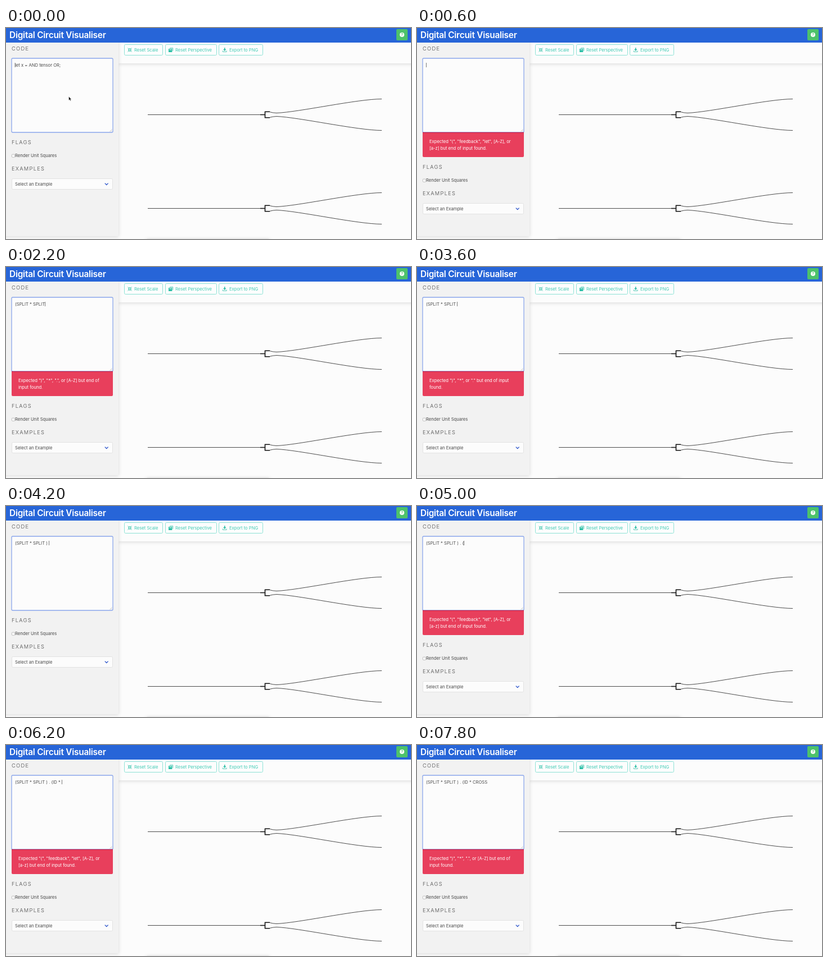
Animation of 720x376 px, one loop 8 s. Source, as an HTML page:

```html
<!DOCTYPE html>
<html lang="en">
<head>
<meta charset="utf-8">
<title>Digital Circuit Visualiser</title>
<style>
  html, body { margin: 0; width: 100%; height: 100%; overflow: hidden; background: #fcfcfc; }
  svg { display: block; width: 720px; height: 376px; }
  text { font: 400 7.65px Inter, Roboto, sans-serif; font-feature-settings: "calt" 0; fill: #4a4a4a; white-space: pre; }
  .title { font-size: 15.4px; font-weight: 600; letter-spacing: -.23px; fill: #fff; }
  .heading { font-size: 9.3px; font-weight: 300; letter-spacing: 1.3px; }
  .panel { filter: drop-shadow(0 1px 3px rgba(10, 10, 10, .15)); }
  .button rect { fill: #fdfdfd; stroke: #8ce2d5; }
  .button text { fill: #3fcbb4; }
  .icon { fill: none; stroke: #2bbfa6; stroke-width: .8; }
  .solid { fill: #2bbfa6; }
  .error text { fill: #fff; }
  .wire { fill: none; stroke: #111; stroke-width: .75; }
  .thick { stroke-width: 1.6; }
</style>
</head>
<body>
<svg viewBox="0 0 720 376">
  <defs>
    <g id="gate" class="wire">
      <path d="M252 154.5H453"/>
      <path class="thick" d="M452 154.5H460M469 149.2H460.5V159.8H469"/>
      <path d="M468 149.4Q474 151.3 481 151.5C520 150 625 126.5 668 126.5"/>
      <path d="M468 159.6Q474 157.7 481 157.5C520 159 625 182.5 668 182.5"/>
    </g>
  </defs>

  <rect width="720" height="376" fill="#fcfcfc"/>
  <use href="#gate"/>
  <use href="#gate" y="167"/>
  <rect class="panel" x="249" y="375.4" width="220" height="8" rx="3" fill="#ddd"/>

  <rect class="panel" x="200" y="20" width="530" height="43" fill="#fcfcfc"/>
  <rect class="panel" x="-6" y="20" width="206" height="351" fill="#f2f2f2"/>

  <rect width="720" height="26" fill="#2765d8"/>
  <text class="title" x="6" y="17.9">Digital Circuit Visualiser</text>
  <rect x="694" y="2" width="20" height="20" rx="2" fill="#4dc26b"/>
  <circle cx="704" cy="12" r="4" fill="#fff"/>
  <text x="704" y="14.4" text-anchor="middle" style="font-size:6.5px;font-weight:700;fill:#4dc26b">?</text>

  <g class="button">
    <rect x="210.5" y="29.5" width="68" height="19" rx="2"/>
    <text x="228" y="41.8">Reset Scale</text>
    <path class="icon" d="M216.5 35.5L219 38M219.2 36V38.2H217M223.5 35.5L221 38M220.8 36V38.2H223M216.5 42.5L219 40M219.2 42V39.8H217M223.5 42.5L221 40M220.8 42V39.8H223"/>
  </g>
  <g class="button">
    <rect x="283.5" y="29.5" width="91" height="19" rx="2"/>
    <text x="301" y="41.8">Reset Perspective</text>
    <path class="icon" d="M291.3 36V35.7H296.7V40.6H296"/>
    <path class="solid" d="M289 37H295.3V43H289ZM290.2 38.2V39.2H294.1V38.2Z" fill-rule="evenodd"/>
  </g>
  <g class="button">
    <rect x="378.5" y="29.5" width="78" height="19" rx="2"/>
    <text x="397" y="41.8">Export to PNG</text>
    <path class="icon" d="M385.3 40.5V42.4H392.2V40.5"/>
    <path class="solid" d="M387.9 35.2H389.6V38H391.4L388.75 41L386.1 38H387.9Z"/>
  </g>

  <text class="heading" x="10" y="40">CODE</text>
  <rect x="10" y="54" width="180" height="132" rx="2" fill="#fcfcfc" stroke="#8ba7eb" stroke-width="1.3"/>
  <path d="M184.5 184.5L188.5 180.5M186.8 184.5L188.5 182.8" stroke="#aaa" stroke-width=".6"/>
  <rect id="selection" x="16" y="60.5" height="11" fill="#b4d5fe"/>
  <text id="code" x="16" y="68.8"></text>
  <rect id="caret" y="62" width=".7" height="8" fill="#444"/>
  <path id="pointer" d="M111.5 122V129L113.1 127.6L114.2 130L115.4 129.5L114.4 127.2H116.4Z" fill="#111" stroke="#fff" stroke-width=".5"/>

  <g id="error" class="error">
    <path d="M10 186H190V228Q190 230 188 230H12Q10 230 10 228Z" fill="#e83f5c"/>
    <path d="M10 186.3H190" stroke="#c7143f"/>
    <text id="line1" x="22" y="204.8"></text>
    <text id="line2" x="22" y="216.8"></text>
  </g>

  <g id="options">
    <text class="heading" x="10" y="206.8">FLAGS</text>
    <rect x="10.4" y="225.2" width="5.2" height="5.2" rx="1" fill="#fff" stroke="#999" stroke-width=".6"/>
    <text x="16" y="229.8">Render Unit Squares</text>
    <text class="heading" x="10" y="254">EXAMPLES</text>
    <rect x="10.5" y="268.5" width="179" height="19" rx="2" fill="#fcfcfc" stroke="#e2e2e2"/>
    <text x="16" y="280.9">Select an Example</text>
    <path d="M175.8 276.6L178.7 279.5L181.6 276.6" fill="none" stroke="#2d55cc" stroke-width="1.3"/>
  </g>
</svg>
<script>
const LOOP = 8000;
const ERRORS = {
  term: ['Expected "(", "feedback", "let", [A-Z], or', '[a-z] but end of input found.'],
  name: ['Expected ")", "*", ".", or [A-Z] but end of', 'input found.'],
  join: ['Expected ")", "*", or "." but end of input', 'found.']
};

// time, code, caret shown, error kind
const STEPS = [
  [0, 'let x = AND tensor OR;', 1, ''],
  [400, 'let x = AND tensor OR;', 0, ''],
  [600, '', 1, 'term'],
  [800, '(', 1, 'term'],
  [1000, '(S', 1, 'name'],
  [1200, '(SPL', 1, 'name'],
  [1400, '(SPLIT', 1, 'name'],
  [1600, '(SPLIT ', 1, 'join'],
  [1800, '(SPLIT * ', 1, 'term'],
  [2000, '(SPLIT * SP', 1, 'name'],
  [2200, '(SPLIT * SPLIT', 1, 'name'],
  [2800, '(SPLIT * SPLIT', 0, 'name'],
  [3200, '(SPLIT * SPLIT ', 1, 'join'],
  [3800, '(SPLIT * SPLIT )', 1, ''],
  [4200, '(SPLIT * SPLIT ) ', 1, ''],
  [4400, '(SPLIT * SPLIT ) .', 1, 'term'],
  [4600, '(SPLIT * SPLIT ) . ', 1, 'term'],
  [5000, '(SPLIT * SPLIT ) . (', 1, 'term'],
  [5400, '(SPLIT * SPLIT ) . (I', 1, 'name'],
  [5600, '(SPLIT * SPLIT ) . (ID', 1, 'name'],
  [5800, '(SPLIT * SPLIT ) . (ID ', 1, 'join'],
  [6000, '(SPLIT * SPLIT ) . (ID *', 1, 'term'],
  [6200, '(SPLIT * SPLIT ) . (ID * ', 1, 'term'],
  [6400, '(SPLIT * SPLIT ) . (ID * C', 1, 'name'],
  [6600, '(SPLIT * SPLIT ) . (ID * CR', 1, 'name'],
  [6800, '(SPLIT * SPLIT ) . (ID * CRO', 1, 'name'],
  [7000, '(SPLIT * SPLIT ) . (ID * CROSS', 1, 'name'],
  [7400, '(SPLIT * SPLIT ) . (ID * CROSS', 0, 'name'],
  [7600, '(SPLIT * SPLIT ) . (ID * CROSS', 1, 'name'],
  [7800, '(SPLIT * SPLIT ) . (ID * CROSS', 0, 'name']
];

const el = id => document.getElementById(id);
const show = (id, on) => el(id).setAttribute('visibility', on ? 'visible' : 'hidden');

function render([time, code, caret, kind]) {
  el('code').textContent = code;
  const width = code ? el('code').getComputedTextLength() : 0;
  el('caret').setAttribute('x', time ? 16 + width : 15.8);
  el('selection').setAttribute('width', width);
  show('caret', caret);
  show('selection', time === 400);
  show('pointer', time <= 400);
  show('error', kind);
  const [first, second] = ERRORS[kind] || ['', ''];
  el('line1').textContent = first;
  el('line2').textContent = second;
  el('options').setAttribute('transform', `translate(0 ${kind ? 44 : 0})`);
}

const start = performance.now();
let current;
function tick() {
  const time = (performance.now() - start) % LOOP;
  const step = STEPS.findLast(([from]) => from <= time);
  if (step !== current) render(current = step);
  requestAnimationFrame(tick);
}
tick();
</script>
</body>
</html>
```
